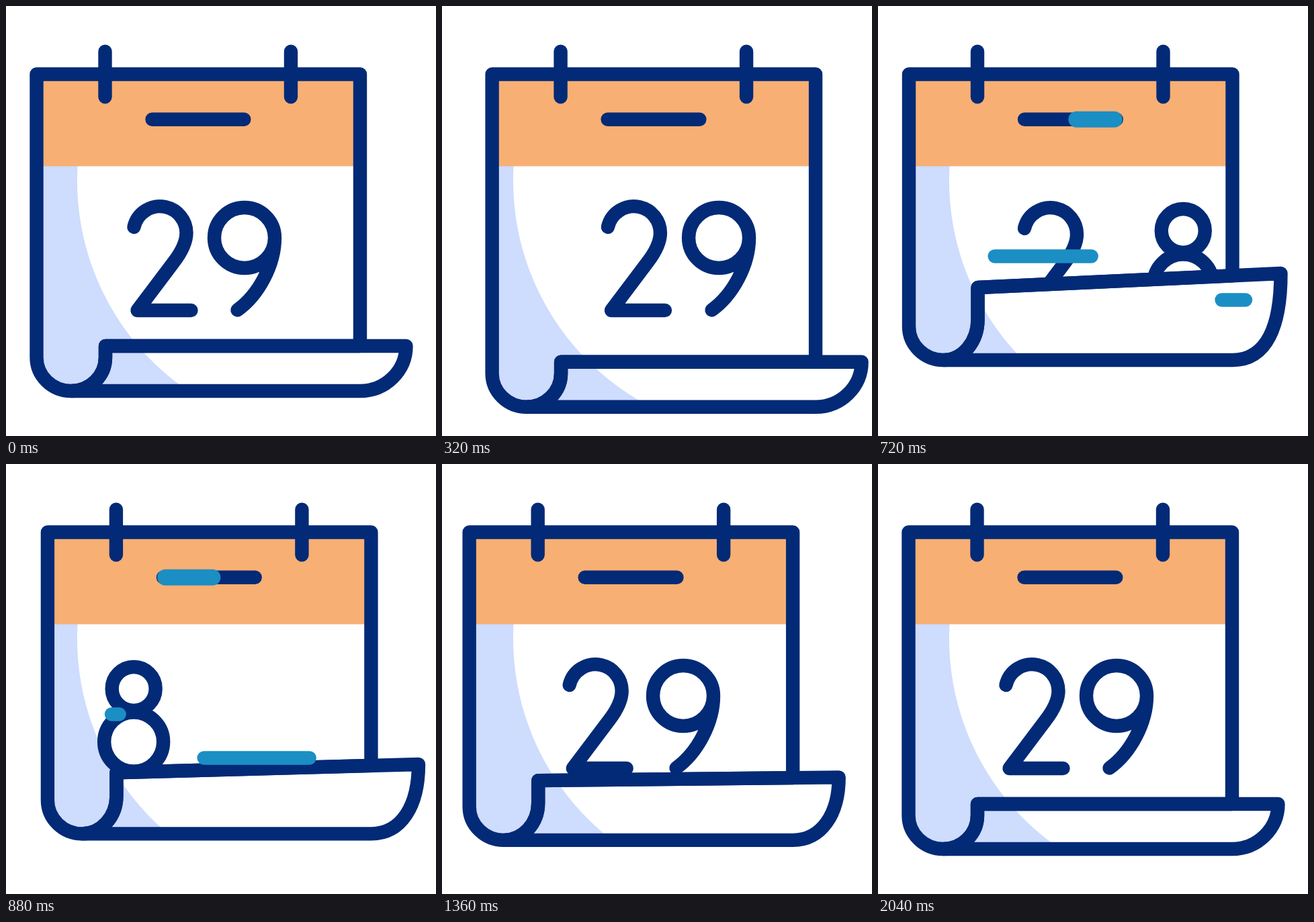
These frames come from a looping animation (640 by 640 pixels, 2880 ms). An HTML page with a canvas:

```html
<!DOCTYPE html>
<html lang="en">
<head>
<meta charset="utf-8">
<title>Calendar</title>
<style>
  html, body { margin: 0; width: 100%; height: 100%; overflow: hidden; background: #fff; }
  canvas { display: block; width: 640px; height: 640px; }
</style>
</head>
<body>
<canvas id="stage" width="640" height="640"></canvas>
<script>
const ctx = document.getElementById('stage').getContext('2d');
const LOOP = 2880, STEP = 40;
const NAVY = '#032a76', ORANGE = '#f7af74', SHADE = '#cedcfd', BLUE = '#1b8ec4';
const LEFT = 45.5, RIGHT = 527, TOP = 101.5, LOOP_X = 97, FOLD_X = 148;
const LAG = 41; // delay of the second digit, ms
const ROUND = 0.5523; // handle length of a quarter circle

// [time, value] keys with eased segments
const SWAY = [[0, 0], [280, 32], [560, -27], [840, 18], [1120, -14], [1520, 0]];
const DROP = [[0, 0], [360, 24.5], [720, -46], [1080, 10.5], [1500, -21], [2040, 0]];
const LIFT_LEFT = [[360, 0], [720, 41], [1080, 0], [1500, 29], [2040, 0]];
const LIFT_RIGHT = [[360, 0], [720, 62], [1080, 0], [1500, 35.3], [2040, 0]];
const REACH = [[360, 0], [720, 3.5], [1080, 0]];

const ease = p => (1 - Math.cos(Math.PI * Math.min(1, Math.max(0, p)))) / 2;
const ramp = (t, from, to) => ease((t - from) / (to - from));

function at(keys, t) {
  let value = keys[0][1];
  for (let i = 1; i < keys.length; i++) {
    value += (keys[i][1] - keys[i - 1][1]) * ramp(t, keys[i - 1][0], keys[i][0]);
  }
  return value;
}

function stroke(path, color = NAVY, width = 20.4) {
  ctx.strokeStyle = color;
  ctx.lineWidth = width;
  ctx.stroke(path);
}

function line(x1, y1, x2, y2, color, width) {
  stroke(new Path2D(`M${x1} ${y1}L${x2} ${y2}`), color, width);
}

// Part of a right-to-left line between its tail and its head
function sweep(x1, x2, y, tail, head, width) {
  if (head - tail < 0.001) return;
  const x = p => x1 + (x2 - x1) * p;
  line(x(tail), y, x(head), y, BLUE, width);
}

const two = new Path2D();
two.arc(229, 337.7, 39.5, Math.PI * 1.07, Math.PI * 2);
two.bezierCurveTo(268.5, 353, 259, 369, 249, 382);
two.lineTo(195.5, 453);
two.lineTo(275.5, 453);
const nine = new Path2D('M400 345A45 45 0 1 1 310 345A45 45 0 1 1 400 345C400 385 376 430 344.5 452.5');
const eight = new Path2D();
eight.arc(355, 334.5, 32.5, 0, 7);
eight.moveTo(399, 413.5);
eight.arc(355, 413.5, 44, 0, 7);

// Horizontal offset of the three numbers passing by
const leaving = t => t < 280 ? 28 * ease(t / 280) : 28 - 328 * ((t - 280) / 320) ** 3;
const passing = t => 27 - 1.75 * (t - 720);
const arriving = t => 115 * (Math.max(0, 1496 - t) / 416) ** 3;

function digit(shape, x, y = 0) {
  ctx.save();
  ctx.translate(x, y);
  stroke(shape);
  ctx.restore();
}

function numbers(t) {
  const late = t < 280 ? t : Math.max(280, t - LAG);
  digit(two, leaving(t));
  digit(nine, leaving(late));
  digit(two, passing(t), 2);
  digit(eight, passing(t - LAG));
  digit(two, arriving(t));
  digit(nine, arriving(t - LAG));
}

function sheets(t) {
  const drop = at(DROP, t), bottom = 573 + drop;
  const liftLeft = at(LIFT_LEFT, t), liftRight = at(LIFT_RIGHT, t);
  const left = 506 + drop - liftLeft;
  const right = 506 + drop - liftRight;
  const reach = 68.5 + at(REACH, t);
  const tip = RIGHT + reach;
  const bend = 50 + liftLeft * 0.25;
  const edge = left + (right - left) * (RIGHT - FOLD_X) / (tip - FOLD_X);

  const page = new Path2D();
  page.moveTo(LEFT, TOP);
  page.lineTo(RIGHT, TOP);
  page.lineTo(RIGHT, edge);
  page.lineTo(FOLD_X, left);
  page.ellipse(LOOP_X, bottom - bend, FOLD_X - LOOP_X, bend, 0, 0, Math.PI / 2);
  page.ellipse(LOOP_X, bottom - 50, LOOP_X - LEFT, 50, 0, Math.PI / 2, Math.PI);
  page.closePath();

  // The end of the curl bulges as it lifts
  const curl = new Path2D();
  curl.moveTo(FOLD_X, left);
  curl.lineTo(tip, right);
  curl.bezierCurveTo(
    tip, right + (bottom - right) * ROUND + liftRight * 0.12,
    RIGHT + reach * ROUND + liftRight * 0.18, bottom,
    RIGHT, bottom);
  curl.lineTo(LOOP_X, bottom);
  curl.ellipse(LOOP_X, bottom - bend, FOLD_X - LOOP_X, bend, 0, Math.PI / 2, 0, true);
  curl.closePath();
  return { page, curl };
}

// White disc that stays still while the sheet moves over it
function paper(sway) {
  const fill = ctx.createRadialGradient(485 - sway, 260, 0, 485 - sway, 260, 379.5);
  fill.addColorStop(0, '#fff');
  fill.addColorStop(0.9975, '#fff');
  fill.addColorStop(1, SHADE);
  return fill;
}

function draw(t) {
  const sway = at(SWAY, t);
  const { page, curl } = sheets(t);
  const fill = paper(sway);
  ctx.fillStyle = '#fff';
  ctx.fillRect(0, 0, 640, 640);

  ctx.save();
  ctx.translate(sway, 0);
  ctx.fillStyle = fill;
  ctx.fill(page);
  ctx.fillStyle = ORANGE;
  ctx.fillRect(LEFT, TOP, RIGHT - LEFT, 238.5 - TOP);

  ctx.save();
  ctx.clip(page);
  numbers(t);
  ctx.restore();

  ctx.fillStyle = fill;
  ctx.fill(curl);
  stroke(page);
  stroke(curl);
  for (const x of [147.5, 424]) line(x, 67.8, x, 135.2);
  line(217.5, 168.7, 354.3, 168.7);
  sweep(354.3, 217.5, 168.8, ramp(t, 680, 1100), ramp(t, 555, 915), 24);
  ctx.restore();

  for (const [y, start] of [[372.5, 373], [437.5, 642]]) {
    sweep(547, 157, y, ramp(t, start + 80, start + 560), ramp(t, start, start + 400), 20.4);
  }
}

ctx.lineCap = ctx.lineJoin = 'round';
const begin = performance.now();

function tick() {
  const t = (performance.now() - begin) % LOOP;
  draw(Math.floor(t / STEP) * STEP);
  requestAnimationFrame(tick);
}
tick();
</script>
</body>
</html>
```
